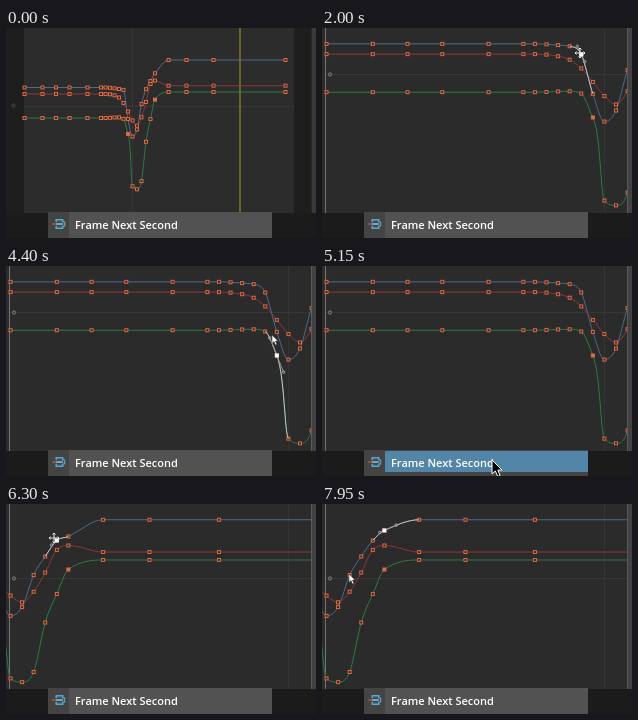
These frames come from a looping animation (310x210 px, 8 s). An HTML page with a canvas:

```html
<!DOCTYPE html>
<html lang="en">
<head>
<meta charset="utf-8">
<title>Curve editor</title>
<style>
html, body { margin: 0; width: 100%; height: 100%; overflow: hidden; background: #1b1b1c; }
canvas { display: block; width: 310px; height: 210px; }
</style>
</head>
<body>
<canvas id="stage"></canvas>
<script>
const LOOP = 8000, STEP = 50, FLOOR = 185;
const canvas = document.getElementById('stage');
const ctx = canvas.getContext('2d');
const dpr = window.devicePixelRatio || 1;
canvas.width = 310 * dpr;
canvas.height = 210 * dpr;

// Key times in animation frames, key values in overview pixels
const times = [0, 4, 7, 10, 14, 17, 18, 19, 20, 21, 22, 23, 24, 25, 26, 27, 28, 29, 32, 36, 42, 58];
const channel = (color, start, middle, end) => ({
  color, values: [...Array(7).fill(start), ...middle, ...Array(4).fill(end)]
});
const blue = channel('#4f6a8c', 59, [59.3, 59.8, 60.5, 61.4, 90.5, 108, 101, 75.5, 60.7, 52.5, 44.8], 31.5);
const red = channel('#8c3838', 65.5, [65.8, 66.8, 69, 74.5, 83, 91.9, 97.2, 88.8, 73.5, 55.5, 52], 57.2);
const green = channel('#2d7a47', 89.5, [89.3, 89, 88.9, 90.3, 105.4, 157.8, 160.8, 152.7, 113.3, 90.6, 71.1], 63.5);
const pinned = [11, 17];
const DROP = 11; // the green key with a hand-set, long tangent

const views = [
  { at: 0, x: 18, sx: 4.5, y: 0, sy: 1, first: 0 },
  { at: 700, x: 4, sx: 11.58, y: -78.3, sy: 1.587, first: 0 },
  { at: 5300, x: 4, sx: 11.58, y: -24.3, sy: 1.256, first: 24 }
];

const selections = [
  { from: 1700, to: 2600, curve: blue, key: 10, arms: [9, 8] },
  { from: 2600, to: 4850, curve: green, key: DROP, arms: [19, 18] },
  { from: 6200, to: 6500, curve: blue, key: 16, arms: [7, 0] },
  { from: 6500, to: 8000, curve: blue, key: 17, arms: [5, 13] }
];

// time, x, y, pointer shape until the next row
const path = [
  [0, 168, 214, ''], [200, 169, 204, 'arrow'], [300, 171, 191, 'arrow'], [900, 171, 191, 'arrow'],
  [1400, 241, 88, 'small'], [1550, 241, 88, 'small'], [1750, 258, 19, 'cross'], [2000, 258, 25, 'cross'],
  [2400, 258, 26, 'small'], [2800, 270, 89, 'small'], [3000, 270, 89, 'small'], [3250, 262, 71, 'small'],
  [3400, 262, 71, 'small'], [3650, 264, 70, 'small'], [3850, 264, 70, 'small'], [3900, 265, 70, 'small'],
  [4050, 265, 70, 'small'], [4250, 266, 69, 'small'], [4400, 266, 69, 'small'], [4900, 290, 187, ''],
  [5050, 168, 203, 'arrow'], [5150, 170, 194, 'arrow'], [5350, 170, 194, 'arrow'], [6050, 50, 42, 'small'],
  [6150, 50, 42, 'cross'], [6300, 48, 34, 'cross'], [6350, 48, 34, 'small'], [6550, 61, 32, 'small'],
  [6700, 61, 32, 'cross'], [7100, 61, 26, 'cross'], [7300, 61, 26, 'small'], [7350, 61, 26, 'small'],
  [7950, 27, 70, 'small'], [8000, 27, 70, 'small']
];

const lerp = (a, b, p) => a + (b - a) * p;
const ramp = (t, from, to) => Math.min(1, Math.max(0, (t - from) / (to - from)));
const ease = p => p * p * (3 - 2 * p);

function pointerAt(t) {
  const i = path.findIndex(row => row[0] > t) - 1;
  const [t0, x0, y0, shape] = path[i], [t1, x1, y1] = path[i + 1];
  const p = ease(ramp(t, t0, t1));
  return { x: lerp(x0, x1, p), y: lerp(y0, y1, p), shape };
}

function pose(t) {
  blue.values[10] = lerp(61.4, 65.7, ramp(t, 1750, 2000));
  blue.values[16] = lerp(52.5, 48, ramp(t, 6150, 6300));
  blue.values[17] = lerp(44.8, 40, ramp(t, 6700, 7100));
  green.slope = lerp(13.5, 18, (ramp(t, 3400, 3650) + ramp(t, 4050, 4250)) / 2);
}

const isDrop = (curve, i) => curve === green && i === DROP;

// Tangent limited so that no segment overshoots its keys
function slope(curve, i) {
  if (isDrop(curve, i)) return green.slope;
  const v = curve.values;
  if (i === 0 || i === v.length - 1) return 0;
  const a = (v[i] - v[i - 1]) / (times[i] - times[i - 1]);
  const b = (v[i + 1] - v[i]) / (times[i + 1] - times[i]);
  if (a * b <= 0) return 0;
  const m = (v[i + 1] - v[i - 1]) / (times[i + 1] - times[i - 1]);
  return Math.sign(m) * Math.min(Math.abs(m), 3 * Math.abs(a), 3 * Math.abs(b));
}

// Half a pixel puts points on pixel centres
const px = (view, time) => view.x + (time - view.first) * view.sx + 0.5;
const py = (view, value) => view.y + value * view.sy + 0.5;

function rect(color, x, y, w, h) {
  ctx.fillStyle = color;
  ctx.fillRect(x, y, w, h);
}

function stroke(color, points, width = 1) {
  ctx.strokeStyle = color;
  ctx.lineWidth = width;
  ctx.beginPath();
  points.forEach(([x, y]) => ctx.lineTo(x, y));
  ctx.stroke();
}

function circle(color, x, y, r) {
  ctx.strokeStyle = color;
  ctx.lineWidth = 1;
  ctx.beginPath();
  ctx.arc(x, y, r, 0, 7);
  ctx.stroke();
}

function text(string, x, y, size, weight, color) {
  ctx.font = `${weight} ${size}px "Open Sans", sans-serif`;
  ctx.fillStyle = color;
  ctx.fillText(string, x, y);
}

function drawCurve(view, curve, from, to, color) {
  ctx.strokeStyle = color;
  ctx.lineWidth = 1;
  ctx.beginPath();
  ctx.moveTo(px(view, times[from]), py(view, curve.values[from]));
  for (let i = from; i < to; i++) {
    const t0 = times[i], t1 = times[i + 1], third = (t1 - t0) / 3;
    const v0 = curve.values[i], v1 = curve.values[i + 1];
    const out = isDrop(curve, i) ? third * 2 : third;
    ctx.bezierCurveTo(
      px(view, t0 + out), py(view, v0 + slope(curve, i) * out),
      px(view, t1 - third), py(view, v1 - slope(curve, i + 1) * third),
      px(view, t1), py(view, v1));
  }
  ctx.stroke();
}

function drawKeys(view, curve) {
  curve.values.forEach((value, i) => {
    const x = px(view, times[i]), y = py(view, value);
    const solid = curve === green && pinned.includes(i);
    rect(solid ? '#e8693f' : '#33251f', x - 1.5, y - 1.5, 3, 3);
    ctx.strokeStyle = '#dc6b45';
    ctx.lineWidth = 1;
    ctx.strokeRect(x - 1.5, y - 1.5, 3, 3);
  });
}

function drawSelection(view, { curve, key, arms }) {
  drawCurve(view, curve, key - 1, key + 1, '#c4c4c4');
  const x = px(view, times[key]), y = py(view, curve.values[key]);
  const angle = Math.atan2(slope(curve, key) * view.sy, view.sx);
  [-arms[0], arms[1]].filter(Boolean).forEach(arm => {
    const hx = x + Math.cos(angle) * arm, hy = y + Math.sin(angle) * arm;
    stroke('#909090', [[x, y], [hx, hy]]);
    circle('#a0a0a0', hx, hy, 1.3);
  });
  rect('#fff', x - 2, y - 2, 4, 4);
}

function drawGraph(t, view) {
  const wide = view === views[0];
  ctx.save();
  ctx.beginPath();
  ctx.rect(0, 0, 306, FLOOR);
  ctx.clip();
  rect(wide ? '#1e1e1f' : '#2b2b2c', 0, 0, 306, FLOOR);
  if (wide) rect('#2c2c2d', 18, 0, 270, FLOOR);

  const zero = Math.floor(py(view, 78.4)) + 0.5;
  const second = Math.floor(px(view, view.first + 24)) + 0.5;
  stroke('#363637', [[wide ? 18 : 4, zero], [wide ? 288 : 306, zero]]);
  stroke('#353536', [[second, 0], [second, FLOOR]]);
  if (wide) stroke('#958e22', [[234, 0], [234, FLOOR]], 1.2);
  else stroke('#747474', [[3.5, 0], [3.5, FLOOR]]);
  circle(wide ? '#515151' : '#858585', wide ? 7.5 : 8, zero - (wide ? 1 : 0), 1.6);

  const curves = [blue, red, green];
  const picked = selections.find(s => t >= s.from && t < s.to);
  curves.forEach(c => drawCurve(view, c, 0, times.length - 1, c.color));
  curves.forEach(c => drawKeys(view, c));
  if (picked) drawSelection(view, picked);
  ctx.restore();

  rect(wide ? '#39393a' : '#424243', 306, 0, 4, FLOOR);
  stroke(wide ? '#29292a' : '#5b5b5c', [[305.5, 0], [305.5, FLOOR]]);
}

function drawIcon(x, y, scale) {
  ctx.save();
  ctx.translate(x, y);
  ctx.scale(scale, scale);
  rect('#28607c', -3, -4.5, 7, 9);
  ctx.strokeStyle = '#66a9cc';
  ctx.lineWidth = 1.4;
  ctx.strokeRect(-3, -4.5, 7, 9);
  rect('#393d40', -5, -1.7, 10, 3.4);
  stroke('#d8604c', [[-7, 0], [-3, 0]], 1.2);
  stroke('#dbe6ea', [[-3, 0], [4, 0]], 1.2);
  stroke('#66a9cc', [[4, -2], [6, -2], [6, 2], [4, 2]], 1.1);
  ctx.restore();
}

function drawTooltip(alpha) {
  if (alpha <= 0) return;
  const ink = '#dcdcdc';
  ctx.save();
  ctx.globalAlpha = alpha;
  ctx.beginPath();
  ctx.rect(196, 85, 114, 100);
  ctx.clip();
  rect('#242422', 196, 85, 114, 100);
  drawIcon(209, 96.5, 1.4);
  text('Frame Next Second', 223, 99.5, 7.3, 700, ink);
  text('Frame one second at a time, only animated', 200, 124, 5.7, 600, ink);
  text('Helps you clearing up your anim curves', 200, 142, 5.9, 600, ink);
  text('editor.', 200, 148.5, 5.7, 600, ink);
  rect('#171717', 200, 161, 110, 7);
  text('TIP: If you select a single key, the range', 200, 184, 5.9, 600, ink);
  ctx.restore();
}

function drawMenu(hover) {
  rect('#1b1b1c', 0, FLOOR, 310, 25);
  rect('#444445', 42, 184, 21, 26);
  rect(hover ? '#444445' : '#525253', 63, 184, 203, 26);
  if (hover) rect('#5285a7', 63, 185, 203, 21);
  drawIcon(53, 196, 0.95);
  text('Frame Next Second', 69, 201, 11, 600, '#fff');
}

function drawPointer({ x, y, shape }) {
  if (!shape) return;
  ctx.save();
  ctx.translate(x, y);
  if (shape === 'cross') {
    for (let i = 0; i < 4; i++) {
      stroke('#e8e8e8', [[0, 0], [5, 0]]);
      stroke('#e8e8e8', [[3.5, -1.5], [5, 0], [3.5, 1.5]]);
      ctx.rotate(Math.PI / 2);
    }
  } else {
    const small = shape === 'small';
    if (small) ctx.scale(0.6, 0.6);
    ctx.beginPath();
    [[0, 0], [0, 14], [3.3, 11], [5.8, 16.5], [8.2, 15.4], [5.8, 10.2], [10, 10]]
      .forEach(([a, b]) => ctx.lineTo(a, b));
    ctx.closePath();
    ctx.fillStyle = small ? '#fff' : '#000';
    ctx.strokeStyle = small ? '#444' : '#fff';
    ctx.lineWidth = 1;
    ctx.fill();
    ctx.stroke();
  }
  ctx.restore();
}

function draw(t) {
  const view = views.filter(v => v.at <= t).pop();
  const pointer = pointerAt(t);
  const hover = pointer.shape && pointer.y > 184 && pointer.x > 42 && pointer.x < 266;
  pose(t);
  ctx.setTransform(dpr, 0, 0, dpr, 0, 0);
  drawGraph(t, view);
  drawTooltip(0.9 * Math.min(ramp(t, 690, 900), 1 - ramp(t, 1000, 1150)));
  drawMenu(hover);
  drawPointer(pointer);
}

const start = performance.now();
function tick() {
  const t = (performance.now() - start) % LOOP;
  draw(Math.floor(t / STEP) * STEP);
  requestAnimationFrame(tick);
}
tick();
</script>
</body>
</html>
```
